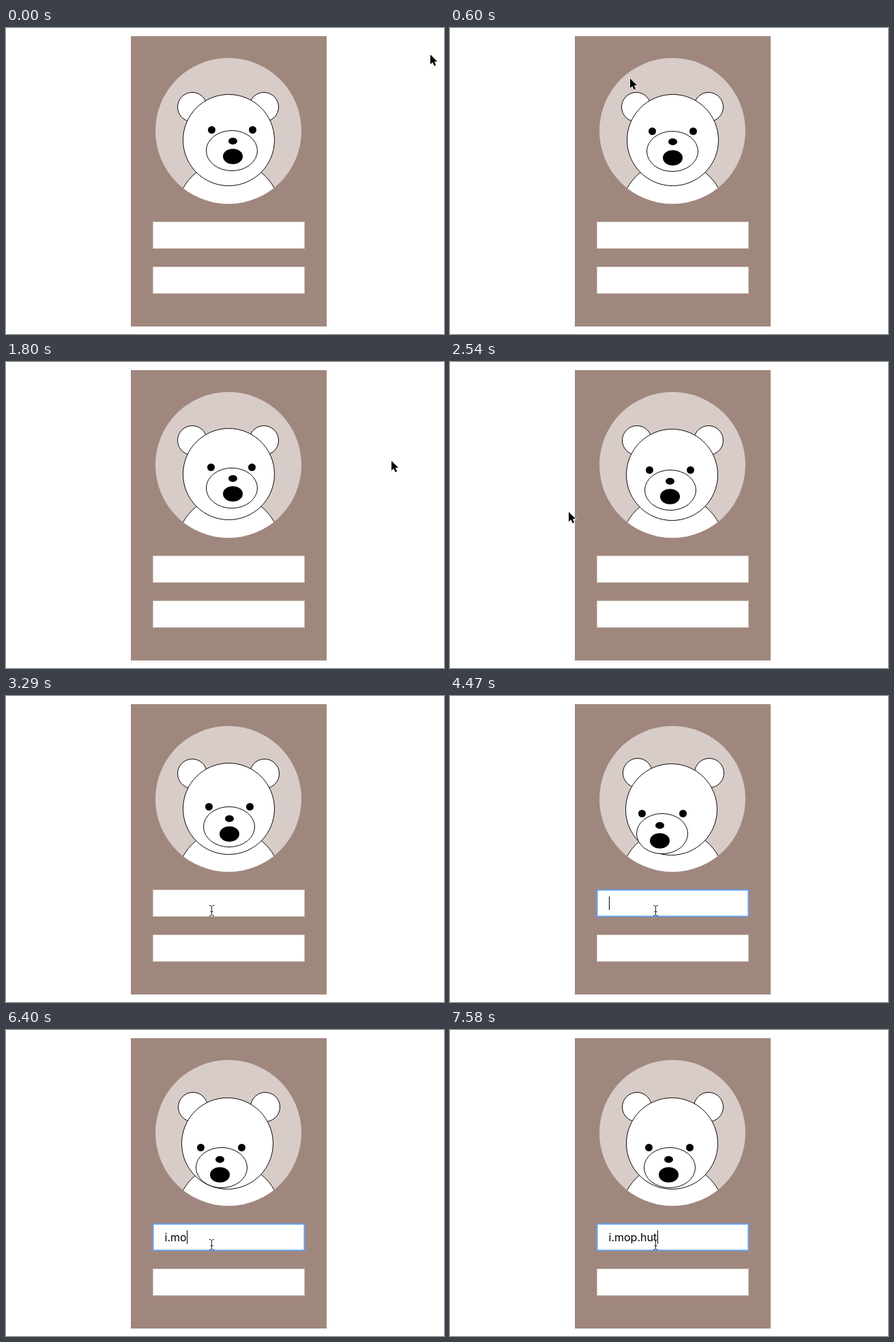
An HTML page that plays this animation: 642 by 449 pixels, repeating every 8000 ms.

```html
<!DOCTYPE html>
<html lang="en">
<head>
<meta charset="utf-8">
<title>Bear login</title>
<style>
  html, body { margin: 0; width: 100%; height: 100%; overflow: hidden; background: #fff; }
  svg { display: block; width: 642px; height: 449px; }
  .line { fill: #fff; stroke: #0c0605; stroke-width: 1; }
  .field { fill: #fff; stroke: #cdc5b9; stroke-width: 1; }
  text { font: 16px Inter, "Open Sans", sans-serif; }
</style>
</head>
<body>
<svg viewBox="0 0 642 449">
  <clipPath id="porthole"><circle cx="326" cy="151" r="107"/></clipPath>
  <rect x="183" y="12" width="287" height="426" fill="#a0877e"/>
  <circle cx="326" cy="151" r="107" fill="#d7ccc8"/>
  <g clip-path="url(#porthole)">
    <circle class="line" cx="326.5" cy="271.6" r="76.2"/>
  </g>
  <circle class="line" id="earL" r="21.5"/>
  <circle class="line" id="earR" r="21.5"/>
  <circle class="line" id="head" r="67"/>
  <circle id="eyeL" r="5.5"/>
  <circle id="eyeR" r="5.5"/>
  <ellipse class="line" id="muzzle" rx="37.5" ry="29.5"/>
  <ellipse id="nose" rx="6.5" ry="5"/>
  <ellipse id="mouth" rx="14.5" ry="11.2"/>

  <rect class="field" x="215.5" y="284.5" width="222" height="39"/>
  <rect class="field" x="215.5" y="350.5" width="222" height="39"/>
  <g id="ring" fill="none">
    <rect x="214.5" y="283.5" width="224" height="41" rx="1" stroke="#5c9df5" stroke-opacity=".3"/>
    <rect x="215.5" y="284.5" width="222" height="39" stroke="#62a4f2"/>
    <rect x="216.5" y="285.5" width="220" height="37" stroke="#9cc5f8"/>
  </g>
  <text id="typed" x="232.5" y="310"></text>
  <rect id="caret" y="294" width="1" height="20"/>

  <path id="arrow" d="M0 0V14.2L3.3 11.2L5.6 16.6L8.1 15.5L5.8 10.3H10.2Z" stroke="#fff" stroke-width="1.2" paint-order="stroke"/>
  <path id="beam" d="M298 307.5H300L301.5 309L303 307.5H305M301.5 309V321M298 322.5H300L301.5 321L303 322.5H305M299.5 316.5H303.5" fill="none" stroke="#222"/>
</svg>
<script>
const LOOP = 8000, STEP = 149.4, FOCUS = 3580, BEAM_STEP = 22;
const TYPE_START = 5661, TYPE_TICK = 147.6;
const KEYS = "i  .mo  p. hut"; // one tick per character, a space is a pause

// The pointer sweeps from side to side between these turning points
const turns = [
  { step: 0, x: 622, y: 39 },
  { step: 6.8, x: 60, y: 98 },
  { step: 11.1, x: 580, y: 132 },
  { step: 19.3, x: 84, y: 254 },
  { step: BEAM_STEP, x: 301, y: 315 }
];

const el = {};
document.querySelectorAll("svg [id]").forEach(node => el[node.id] = node);

const mix = (a, b, u) => a + (b - a) * u;
const whole = Math.floor;
const half = v => Math.floor(v) + 0.5;

function pointerAt(step) {
  const next = Math.max(1, turns.findIndex(turn => turn.step >= step));
  const a = turns[next - 1], b = turns[next];
  const u = (step - a.step) / (b.step - a.step);
  return {
    x: mix(a.x, b.x, (1 - Math.cos(Math.PI * u)) / 2),
    y: mix(a.y, b.y, u)
  };
}

function place(id, x, y) {
  el[id].setAttribute("cx", x);
  el[id].setAttribute("cy", y);
}

function show(id, visible) {
  el[id].setAttribute("visibility", visible ? "visible" : "hidden");
}

// Nearer parts move further with the gaze; the ears move against it
function look(dx, dy) {
  const earY = whole(116.3 - 0.14 * dy);
  const eyeX = half(296.5 + dx), eyeY = half(150.9 + 1.03 * dy);
  const noseX = half(326.8 + 1.23 * dx);
  place("earL", whole(273.75 - 0.11 * dx), earY);
  place("earR", whole(379.2 - 0.11 * dx), earY);
  place("head", half(326.3 + 0.13 * dx), half(164.4 + 0.1 * dy));
  place("eyeL", eyeX, eyeY);
  place("eyeR", eyeX + 60, eyeY);
  place("muzzle", whole(327 + dx), whole(181.2 + dy));
  place("nose", noseX, whole(167.3 + 1.1 * dy));
  place("mouth", noseX, half(189.6 + 1.1 * dy));
}

function draw(t) {
  const focused = t >= FOCUS;
  const step = Math.min(BEAM_STEP, Math.floor(t / STEP));
  const ticks = Math.max(0, Math.floor((t - TYPE_START) / TYPE_TICK) + 1);
  const value = KEYS.slice(0, ticks).replaceAll(" ", "");
  const caretOn = value || (t - 3424) % 1046 < 600;
  if (el.typed.textContent !== value) el.typed.textContent = value;

  show("ring", focused);
  show("caret", focused && caretOn);
  show("beam", step === BEAM_STEP);
  show("arrow", step < BEAM_STEP);

  if (focused) {
    const width = value ? el.typed.getComputedTextLength() : 0;
    el.caret.setAttribute("x", Math.round(233 + width));
    look(0.148 * width - 15.4, 21);
  } else {
    const { x, y } = pointerAt(step);
    el.arrow.setAttribute("transform", `translate(${Math.round(x)} ${Math.round(y)})`);
    look(5.6 - 6 * Math.exp((265 - x) / 200), 0.0455 * (y - 39) - 1);
  }
}

function tick() {
  draw(performance.now() % LOOP);
  requestAnimationFrame(tick);
}
tick();
</script>
</body>
</html>
```
